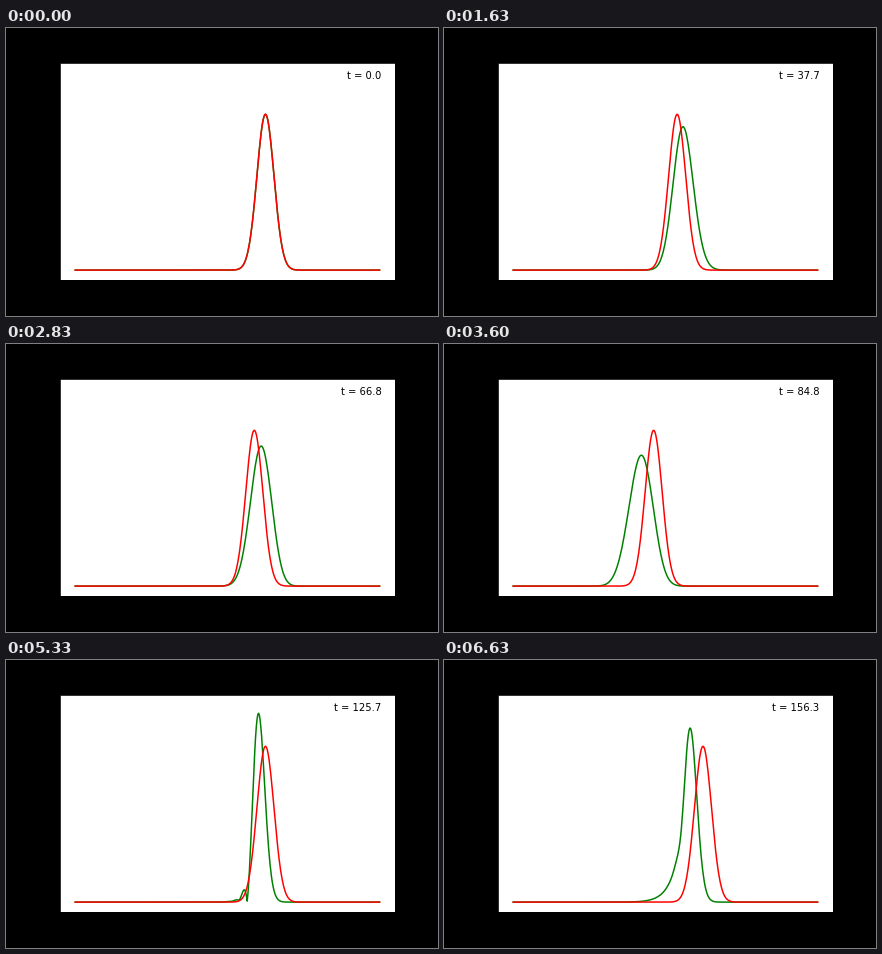
Recreate the animation shown at these times as a matplotlib script. Size 432 by 288 pixels, loop 6660 ms.

```python
import numpy as np
import matplotlib.pyplot as plt
from matplotlib.animation import FuncAnimation

# Coherent wave packet (hbar = m = 1): harmonic trap versus Gaussian trap
OMEGA = 0.2
START = 10.0
TRAP_WIDTH = 30.0
HALF = 40.0
POINTS = 401
FRAMES = 200
LOOP_MS = 6660
DT = np.pi / 4

x = np.linspace(-HALF, HALF, POINTS)
dx = x[1] - x[0]


def packet(center):
    return (OMEGA / np.pi) ** 0.25 * np.exp(-OMEGA * (x - center) ** 2 / 2)


def hamiltonian():
    """Sinc-basis kinetic energy plus a Gaussian well with the same curvature."""
    i = np.arange(POINTS)
    d = i[:, None] - i[None, :]
    sign = 1.0 - 2.0 * (np.abs(d) % 2)
    kinetic = sign / np.where(d == 0, 1, d) ** 2
    np.fill_diagonal(kinetic, np.pi ** 2 / 6)
    depth = (OMEGA * TRAP_WIDTH) ** 2
    well = depth * (1 - np.exp(-x ** 2 / (2 * TRAP_WIDTH ** 2)))
    return kinetic / dx ** 2 + np.diag(well)


energy, modes = np.linalg.eigh(hamiltonian())
weights = modes.T @ packet(START)


def trapped(t):
    return np.abs(modes @ (weights * np.exp(-1j * energy * t)))


def harmonic(t):
    return packet(START * np.cos(OMEGA * t))


plt.rcParams["font.family"] = "DejaVu Sans"
fig = plt.figure(figsize=(6, 4), dpi=72, facecolor="black")
fig.subplots_adjust(left=0.125, right=0.9, bottom=0.125, top=0.88)
ax = fig.add_subplot()
ax.set(xticks=[], yticks=[])

top = 0.637
ax.set_xlim(-1.1 * HALF, 1.1 * HALF)
ax.set_ylim(-0.05 * top, 1.05 * top)

green, = ax.plot(x, trapped(0), color="green", lw=1.5)
red, = ax.plot(x, harmonic(0), color="red", lw=1.5)
label = ax.text(0.96, 0.96, "t = 0.0", transform=ax.transAxes,
                ha="right", va="top", fontsize=10)


def update(frame):
    t = frame * DT
    green.set_ydata(trapped(t))
    red.set_ydata(harmonic(t))
    label.set_text(f"t = {t:.1f}")
    return green, red, label


anim = FuncAnimation(fig, update, frames=FRAMES, interval=LOOP_MS / FRAMES,
                     repeat=True, repeat_delay=0, blit=False)
plt.show()
```
